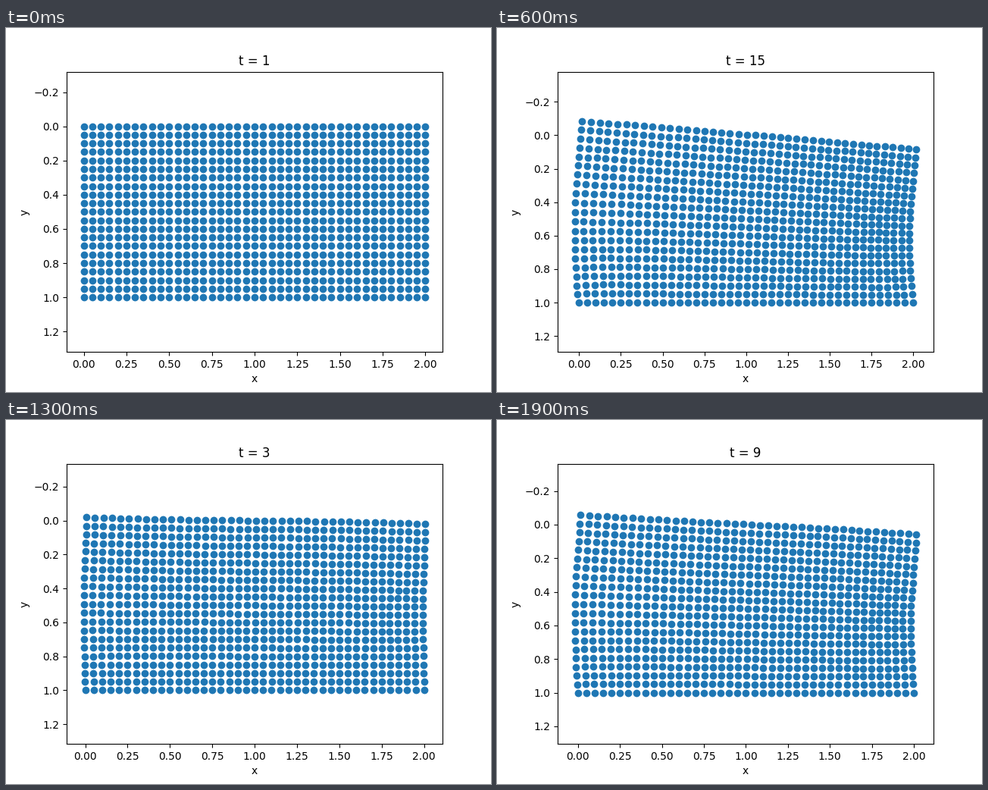
A matplotlib script that plays this animation: 640 px wide and 480 px high, repeating every 2000 ms.

```python
import numpy as np
import matplotlib.pyplot as plt
from matplotlib.animation import FuncAnimation

# Poroelastic block on a fixed base: one well injects, one withdraws.
NX, NY, H = 41, 21, 0.05
STEPS = 20
DIFFUSIVITY = 0.0195
POISSON = 0.25
UPLIFT = 0.0925            # rise of the top left corner at step 17
WELLS = ((0.2, 0.5, 1.0), (1.8, 0.5, -1.0))


def node(i, j):
    return j * NX + i


def element_matrices():
    """Stiffness, pressure coupling, mass and conductance of a square cell."""
    lam, mu = 2 * POISSON / (1 - 2 * POISSON), 1.0
    elastic = np.array([[lam + 2 * mu, lam, 0], [lam, lam + 2 * mu, 0], [0, 0, mu]])
    sx, sy = np.array([-1, 1, 1, -1]), np.array([-1, -1, 1, 1])
    stiff, couple = np.zeros((8, 8)), np.zeros((8, 4))
    mass, cond = np.zeros((4, 4)), np.zeros((4, 4))
    w = H * H / 4
    for a in (-1, 1):
        for b in (-1, 1):
            r, s = a / np.sqrt(3), b / np.sqrt(3)
            shape = (1 + sx * r) * (1 + sy * s) / 4
            gx = sx * (1 + sy * s) / (2 * H)
            gy = sy * (1 + sx * r) / (2 * H)
            strain = np.zeros((3, 8))
            strain[0, 0::2] = strain[2, 1::2] = gx
            strain[1, 1::2] = strain[2, 0::2] = gy
            stiff += w * strain.T @ elastic @ strain
            couple += w * np.outer(strain[0] + strain[1], shape)
            mass += w * np.outer(shape, shape)
            cond += w * (np.outer(gx, gx) + np.outer(gy, gy))
    return stiff, couple, mass, cond


def assemble():
    n = NX * NY
    stiff, couple = np.zeros((2 * n, 2 * n)), np.zeros((2 * n, n))
    mass, cond = np.zeros((n, n)), np.zeros((n, n))
    ke, qe, me, ce = element_matrices()
    for j in range(NY - 1):
        for i in range(NX - 1):
            c = np.array([node(i, j), node(i + 1, j), node(i + 1, j + 1), node(i, j + 1)])
            d = np.stack([2 * c, 2 * c + 1], axis=1).ravel()
            stiff[np.ix_(d, d)] += ke
            couple[np.ix_(d, c)] += qe
            mass[np.ix_(c, c)] += me
            cond[np.ix_(c, c)] += ce
    return stiff, couple, mass, cond


def displacements():
    """Displacement of every node at steps 1 to STEPS."""
    n = NX * NY
    stiff, couple, mass, cond = assemble()
    rate = np.zeros(n)
    for x, y, q in WELLS:
        rate[node(round(x / H), round(y / H))] = q
    step = np.linalg.inv(mass + DIFFUSIVITY * cond)
    pressure = [np.zeros(n)]
    for _ in range(STEPS - 1):
        pressure.append(step @ (mass @ pressure[-1] + rate))
    free = 2 * node(0, NY - 1)
    load = couple @ np.array(pressure).T
    disp = np.zeros((2 * n, STEPS))
    disp[:free] = np.linalg.solve(stiff[:free, :free], load[:free])
    disp *= -UPLIFT / disp[1, 16]
    return disp.T.reshape(STEPS, n, 2)


xs, ys = np.meshgrid(np.arange(NX) * H, np.arange(NY) * H)
grid = np.stack([xs.ravel(), ys.ravel()], axis=1)
moved = grid + displacements()
order = sorted(range(1, STEPS + 1), key=str)   # steps play in text order

fig, ax = plt.subplots(figsize=(6.4, 4.8), dpi=100)


def draw(k):
    t = order[k]
    ax.clear()
    ax.scatter(*moved[t - 1].T)
    ax.axis("equal")
    ax.invert_yaxis()
    ax.set_title(f"t = {t}")
    ax.set_xlabel("x")
    ax.set_ylabel("y")


anim = FuncAnimation(fig, draw, frames=STEPS, interval=100, repeat=True)
plt.show()
```
